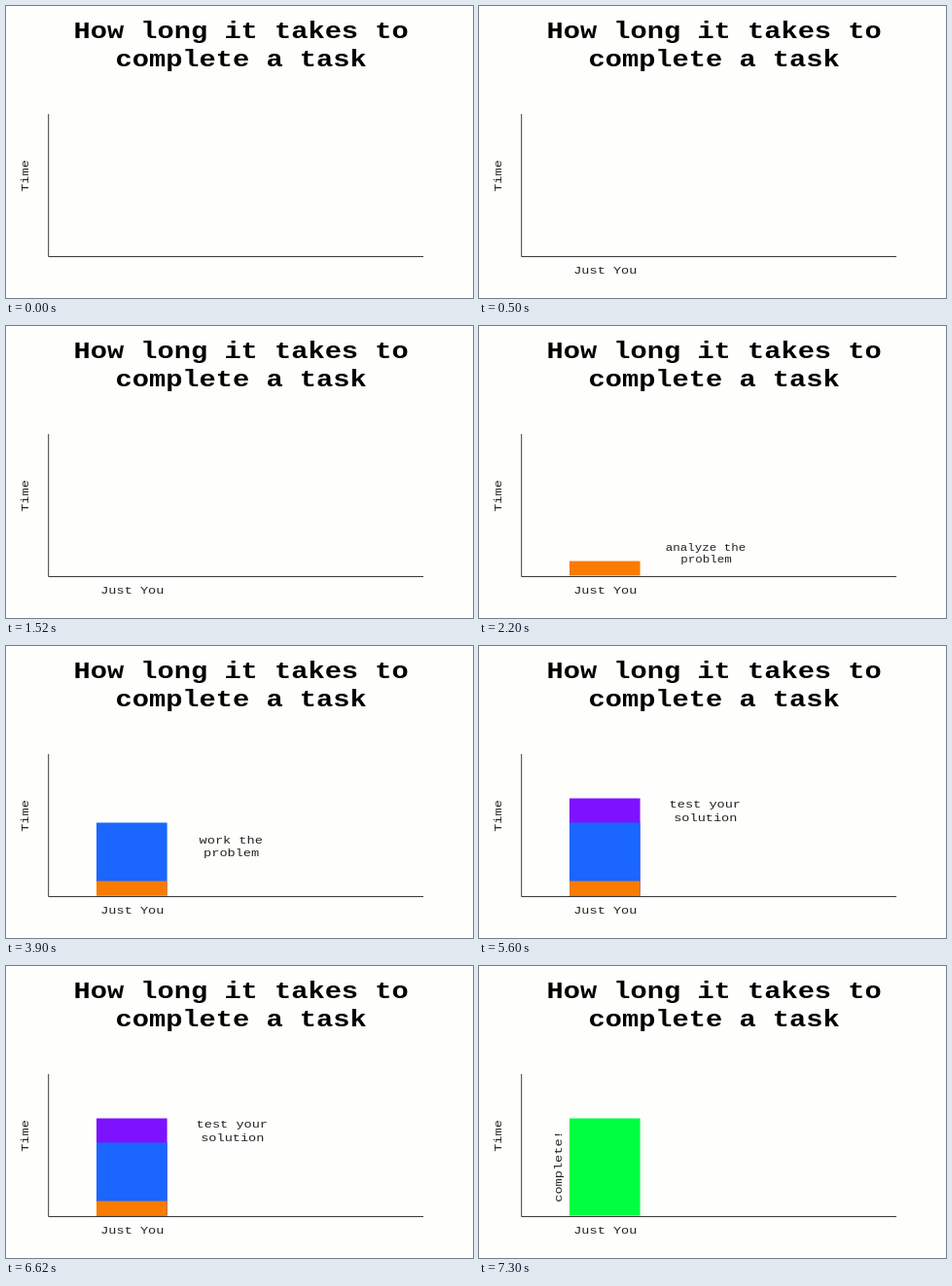
Recreate the animation shown at these times as an HTML page. Size 480 px wide and 300 px high, loop 8 s.

```html
<!DOCTYPE html>
<html lang="en">
<head>
<meta charset="utf-8">
<title>How long it takes to complete a task</title>
<style>
  html, body { margin: 0; width: 100%; height: 100%; overflow: hidden; background: #fefefc; }
  svg { display: block; width: 480px; height: 300px; }
  text { font-family: "Courier New", "Liberation Mono", monospace; text-anchor: middle; fill: #222; }
  .title { font-weight: bold; fill: #000; }
</style>
</head>
<body>
<svg id="stage" viewBox="0 0 480 300">
  <rect width="480" height="300" fill="#fefefc"/>
  <path d="M43.7 111V257.5H429" fill="none" stroke="#3a3a3a"/>
</svg>
<script>
  const LOOP = 8000;
  const STEP = { label: 500, analyze: 2200, work: 3900, test: 5600, done: 7300 };
  const BASE = 256.5;
  const SQUAT = 0.86; // low letterforms on a wide pitch
  const stage = document.getElementById('stage');
  const parts = [];

  function add(tag, attrs, from, to) {
    const el = document.createElementNS('http://www.w3.org/2000/svg', tag);
    for (const name in attrs) el.setAttribute(name, attrs[name]);
    stage.append(el);
    parts.push({ el, from, to });
    return el;
  }

  function label(text, x, y, { from = 0, to = LOOP, size = 13.6, turn = 0, cls = '' } = {}) {
    const transform = `translate(${x} ${y}) rotate(${turn}) scale(1 ${SQUAT})`;
    add('text', { transform, 'font-size': size, class: cls }, from, to).textContent = text;
  }

  // Every bar reaches the base line; shorter ones are stacked in front.
  function bar(top, fill, from, to) {
    add('rect', { x: 93, y: top, width: 72.6, height: BASE - top, fill }, from, to);
  }

  const title = { size: 28.7, cls: 'title' };
  label('How long it takes to', 241.6, 33, title);
  label('complete a task', 241.6, 62, title);
  label('Time', 23, 174.5, { turn: -90 });
  label('Just You', 129.8, 275, { from: STEP.label });

  bar(156.5, '#7d12ff', STEP.test, STEP.done);
  bar(181.5, '#1a66ff', STEP.work, STEP.done);
  bar(241.5, '#f97c00', STEP.analyze, STEP.done);
  bar(156.5, '#00ff41', STEP.done, LOOP);

  const analyze = { from: STEP.analyze, to: STEP.work, size: 12.5 };
  label('analyze the', 233, 230.5, analyze);
  label('problem', 233.5, 242.5, analyze);

  const work = { from: STEP.work, to: STEP.test };
  label('work the', 231.2, 203, work);
  label('problem', 231.6, 216, work);

  const test = { from: STEP.test, to: STEP.done };
  label('test your', 232.3, 166, test);
  label('solution', 232.8, 179.5, test);

  label('complete!', 85.3, 206, { from: STEP.done, turn: -90 });

  function draw(t) {
    for (const { el, from, to } of parts) {
      el.style.display = t >= from && t < to ? '' : 'none';
    }
  }

  const start = performance.now();
  function tick() {
    draw((performance.now() - start) % LOOP);
    requestAnimationFrame(tick);
  }
  tick();
</script>
</body>
</html>
```
